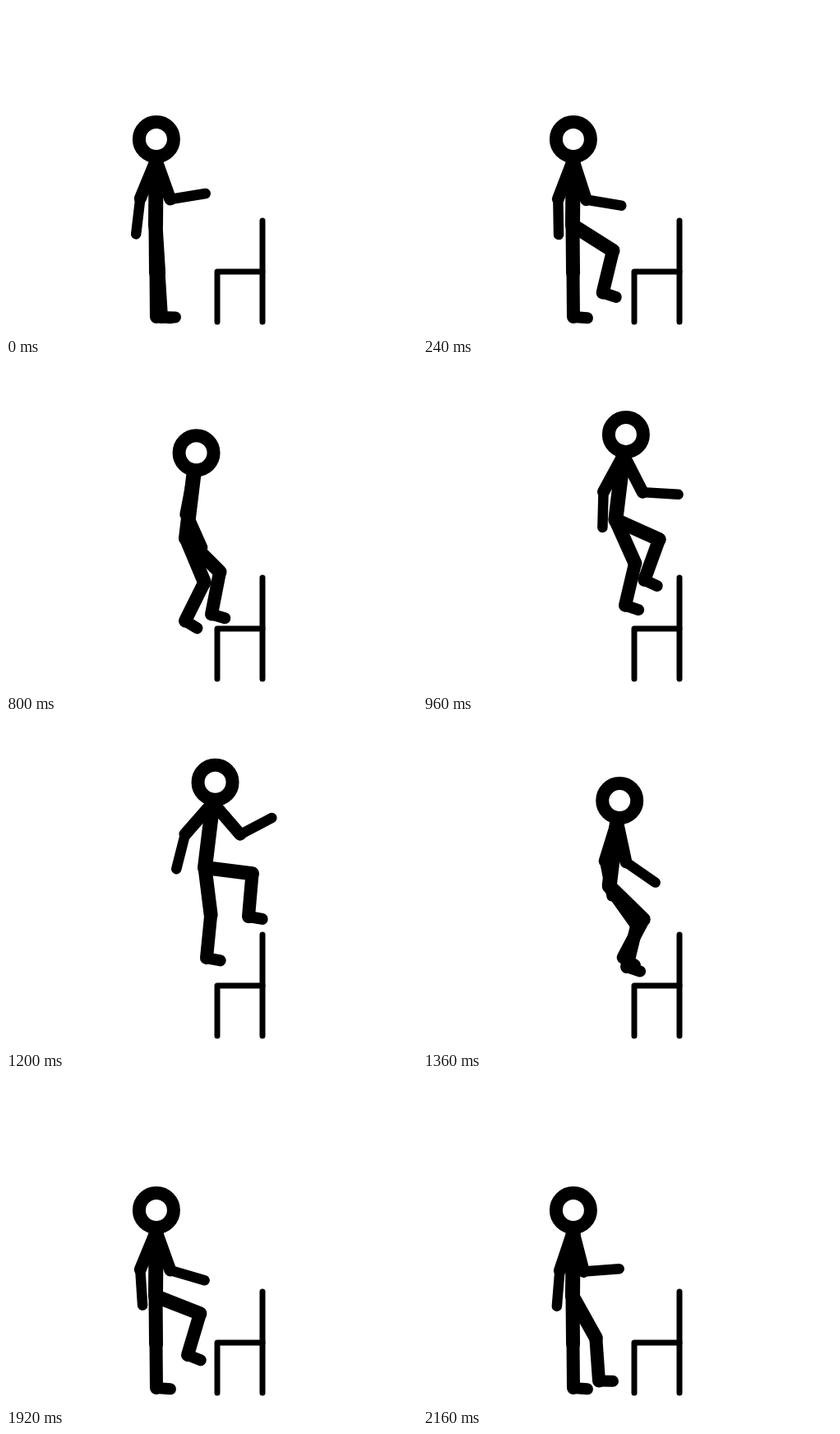
Write an HTML page with a canvas that moves like this. It is 500 px wide and 400 px high and loops after 2.24 s.

```html
<!DOCTYPE html>
<html lang="en">
<head>
<meta charset="utf-8">
<title>Climbing stick figure</title>
<style>
  html, body { margin: 0; width: 100%; height: 100%; overflow: hidden; background: #fff; }
  canvas { display: block; }
</style>
</head>
<body>
<canvas id="stage" width="500" height="400"></canvas>
<script>
const ctx = document.getElementById('stage').getContext('2d');
const STEP = 80;
const PEAK = 14; // steps from the floor to the highest pose

// Bone lengths
const TORSO = 79.5, NECK = 25, UPPER_ARM = 51, FOREARM = 43.5;
const THIGH = 58, SHIN = 52.5, FOOT = 17;

// Key points: [step, x, y], held before the first and after the last.
const HIP = [[4, 182, 266.5], [6, 191, 253], [8, 204, 226], [10, 219, 213], [13, 242, 179.5], [14, 243.5, 175.5]];
const LEAD_ANKLE = [[0, 189, 378], [1, 214, 369.5], [4, 221, 338], [6, 247.5, 311.5], [8, 246, 306], [10, 250, 305.5], [13, 244, 289.3]];
const TRAIL_ANKLE = [[4, 183, 378], [6, 177, 363], [8, 191, 337], [10, 218, 313.5], [13, 295, 239]];

// [step, half angle between the upper arms, half angle between the forearms]
const ARM_SPREAD = [[0, 21, 53], [1, 16.5, 49.5], [4, 21, 35], [6, 19.5, 40.5], [8, 8, 9], [10, 1.5, 0], [13, 41, 66]];

const clamp = (v, lo = 0, hi = 1) => Math.min(hi, Math.max(lo, v));

function along(keys, k) {
  const i = clamp(keys.findIndex(key => key[0] >= k), 1, keys.length - 1);
  const last = k > keys.at(-1)[0] ? keys.length - 1 : i;
  const [ka, xa, ya] = keys[last - 1], [kb, xb, yb] = keys[last];
  const u = clamp((k - ka) / (kb - ka));
  return [xa + (xb - xa) * u, ya + (yb - ya) * u];
}

// Angles are in degrees from straight down, positive to the right.
function reach([x, y], length, degrees) {
  const r = degrees * Math.PI / 180;
  return [x + length * Math.sin(r), y + length * Math.cos(r)];
}

const heading = (a, b) => Math.atan2(b[0] - a[0], b[1] - a[1]) * 180 / Math.PI;

function stroke(width, ...points) {
  ctx.lineWidth = width;
  ctx.beginPath();
  points.forEach(p => ctx.lineTo(...p));
  ctx.stroke();
}

function drawChair() {
  stroke(7, [257, 384], [257, 323], [312, 323]);
  stroke(7, [312, 261], [312, 384]);
}

function drawArm(neck, upper, lower) {
  const elbow = reach(neck, UPPER_ARM, upper);
  stroke(15, neck, elbow);
  stroke(12.5, elbow, reach(elbow, FOREARM, lower));
}

// The knee bends forward as far as the ankle's distance demands.
function drawLeg(hip, ankle) {
  const d = Math.hypot(ankle[0] - hip[0], ankle[1] - hip[1]);
  const bend = Math.acos(clamp((THIGH ** 2 + d * d - SHIN ** 2) / (2 * THIGH * d), -1, 1));
  const knee = reach(hip, THIGH, heading(hip, ankle) + bend * 180 / Math.PI);
  const toe = reach(ankle, FOOT, heading(knee, ankle) + 85);
  stroke(17, hip, knee);
  stroke(16, knee, ankle);
  stroke(14, ankle, toe);
}

function drawFigure(k) {
  const hip = along(HIP, k);
  const up = 179.5 - 6.4 * clamp((k - 7.8) / 2.2);
  const neck = reach(hip, TORSO, up);
  const head = reach(neck, NECK, up);
  stroke(18, hip, neck);
  ctx.lineWidth = 16;
  ctx.beginPath();
  ctx.arc(...head, 21, 0, Math.PI * 2);
  ctx.stroke();

  const [upper, lower] = along(ARM_SPREAD, k);
  const back = -11 * Math.exp(-upper / 10); // closed arms hang behind the body
  const raise = 24 + 0.42 * lower;
  drawArm(neck, back - upper, raise - lower);
  drawArm(neck, back + upper, raise + lower);

  drawLeg(hip, along(LEAD_ANKLE, k));
  drawLeg(hip, along(TRAIL_ANKLE, k));
}

const start = performance.now();

function render() {
  const n = Math.floor((performance.now() - start) / STEP) % (2 * PEAK);
  ctx.fillStyle = '#fff';
  ctx.fillRect(0, 0, 500, 400);
  ctx.strokeStyle = '#000';
  ctx.lineCap = ctx.lineJoin = 'round';
  drawChair();
  drawFigure(Math.min(n, 2 * PEAK - n)); // up, then back down
  requestAnimationFrame(render);
}
render();
</script>
</body>
</html>
```
